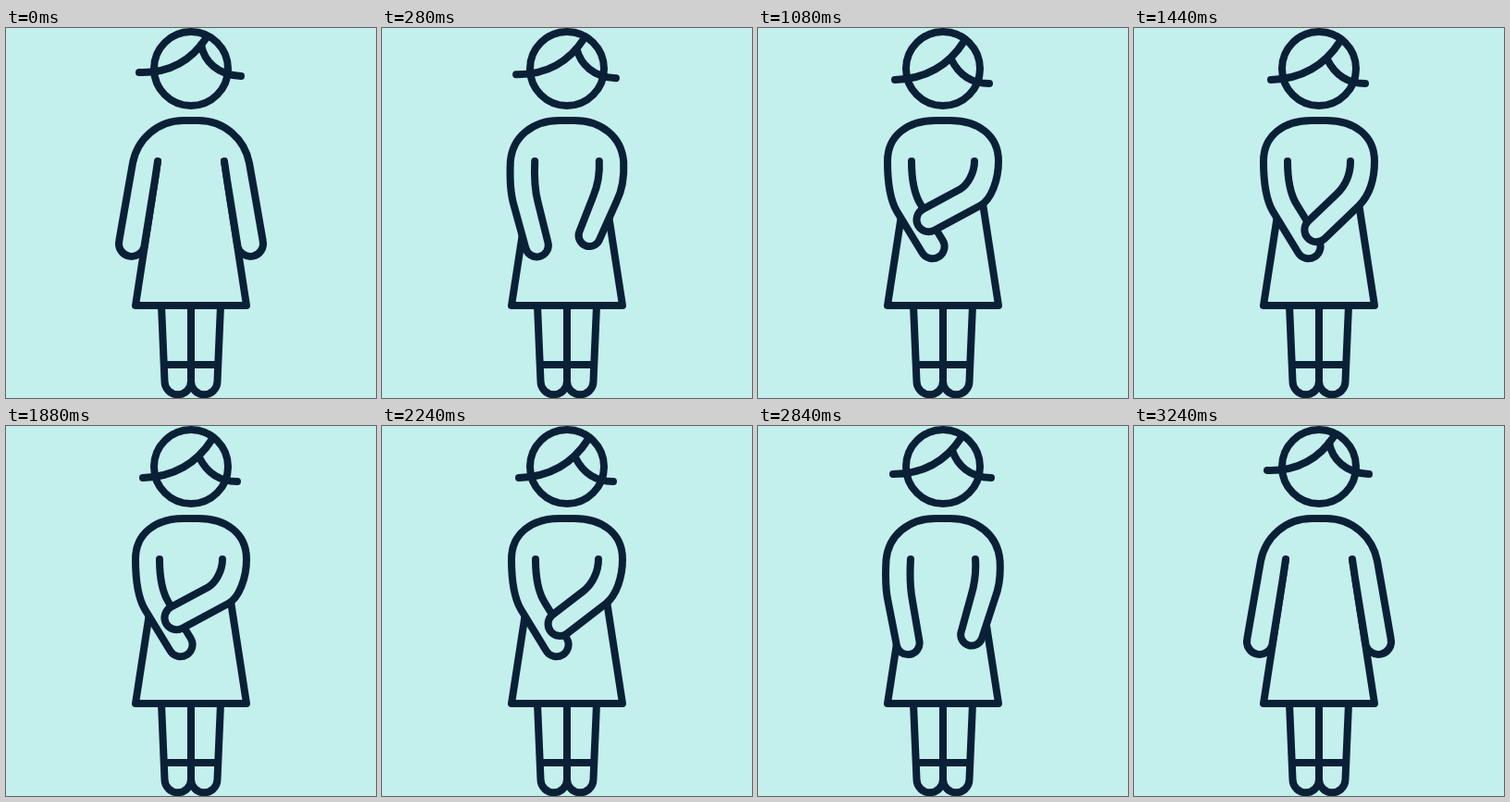
Recreate the animation shown at these times as an HTML page. Size 400 px wide and 400 px high, loop 5 s.

```html
<!DOCTYPE html>
<html lang="en">
<head>
<meta charset="utf-8">
<title>Fidgeting figure</title>
<style>
  :root { --paper: #c3efec; --ink: #0a2036; }
  html, body { margin: 0; height: 100%; overflow: hidden; background: var(--paper); }
  svg { display: block; width: 100%; height: 100%; }
  path, circle {
    fill: none; stroke: var(--ink); stroke-width: 8;
    stroke-linecap: round; stroke-linejoin: round;
  }

  .hair, .arm {
    d: var(--rest);
    animation: 5s cubic-bezier(.37, 0, .63, 1) infinite;
  }
  .hair { animation-name: nod; }
  .arm { fill: var(--paper); }
  .left { animation-name: hold; }
  .right { animation-name: rub; }

  .fringe {
    --rest: path("M144 48C176 49 200 36 217 10");
    --bent: path("M148 56C180 55 206 41 223 14");
  }
  .lock {
    --rest: path("M211 18C214 36 229 51 254 52");
    --bent: path("M209 34C216 48 228 60 250 60");
  }
  /* Shoulder, outer arm, round hand, inner arm. */
  .left {
    --rest: path("M200 100L192 100C164 100 142 120 137 146C135 157 133 169 131 180L122.3 230A1 1 0 0 0 149.5 236L157.7 185C160 171 162 158 164 144");
    --low: path("M200 100L192 100C162 100 140 116 140 144C140 170 143 186 150 198L177.5 243A1 1 0 0 0 199.7 229.5L176 191C169 180 166 164 166 144");
  }
  .right {
    --rest: path("M200 100L208 100C236 100 258 120 263 146C265 157 267 169 269 180L277.7 230A1 1 0 0 1 250.5 236L242.3 185C240 171 238 158 236 144");
    --low: path("M200 100L208 100C238 100 260 116 260 144C260 164 254 181 243.5 191.8L206.5 227.8A1 1 0 0 1 188.5 209.2L219 179.8C228 171 234 158 234 144");
    --high: path("M200 100L208 100C238 100 260 116 260 144C260 164 252 186 240 192L189.4 218.1A1 1 0 0 1 177.6 194.9L218 174.2C227 169 234 156 234 144");
  }

  @keyframes nod {
    0%, 64.8%, 100% { d: var(--rest); }
    16%, 48.8% { d: var(--bent); }
  }
  @keyframes hold {
    0%, 64.8%, 100% { d: var(--rest); }
    10%, 48.8% { d: var(--low); }
  }
  @keyframes rub {
    0%, 64.8%, 100% { d: var(--rest); }
    10%, 29.6%, 48.8% { d: var(--low); }
    20%, 39.2% { d: var(--high); }
  }
</style>
</head>
<body>
<svg viewBox="0 0 400 400">
  <circle cx="200" cy="44" r="40"/>
  <path class="hair fringe"/>
  <path class="hair lock"/>
  <path d="M168 300L171.5 382A14.25 14.25 0 0 0 200 382V300M232 300L228.5 382A14.25 14.25 0 0 1 200 382M171 364H229"/>
  <path d="M164 144L140 300H260L236 144"/>
  <path class="arm left"/>
  <path class="arm right"/>
</svg>
</body>
</html>
```
